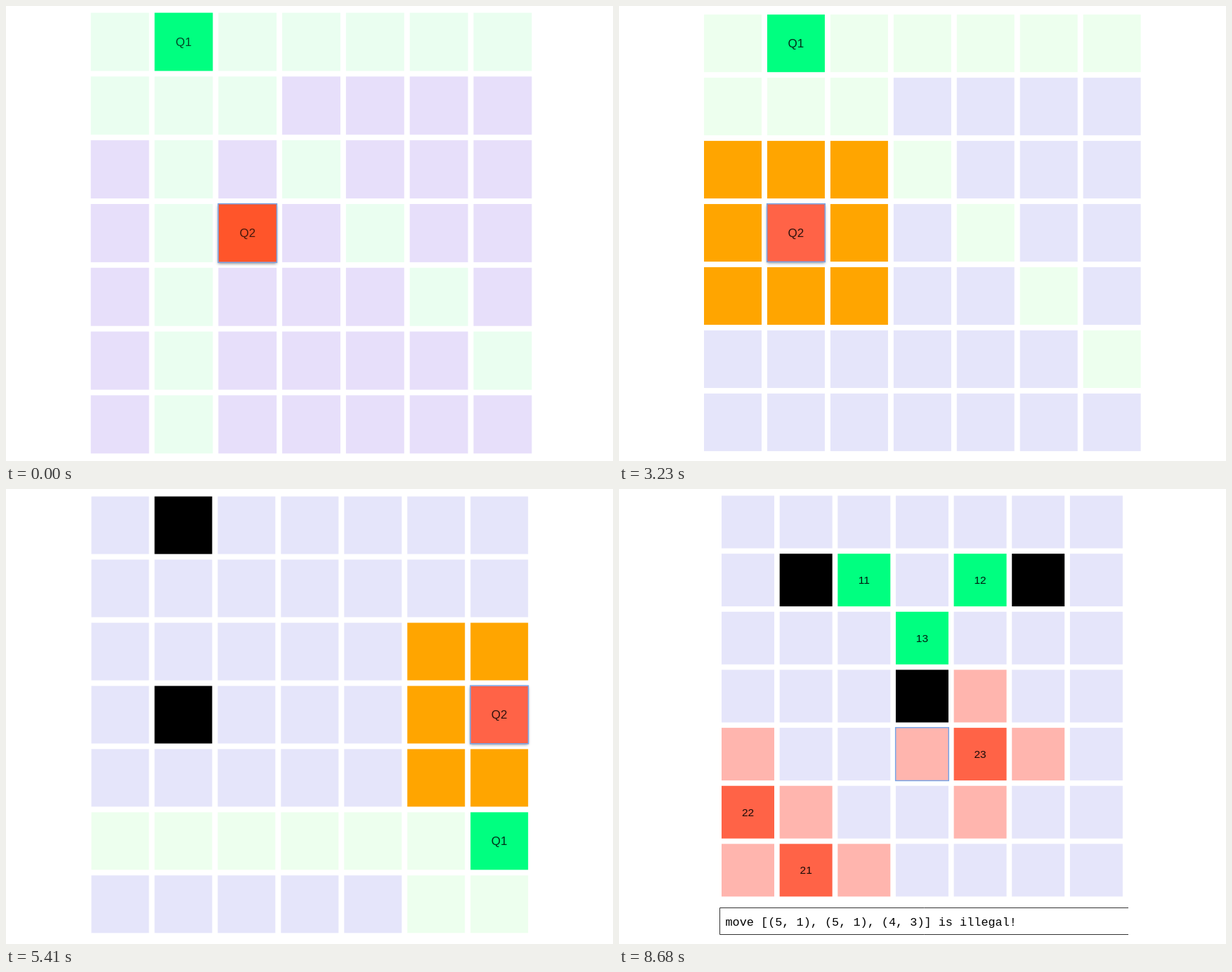
An HTML page with a canvas that plays this animation: 864 by 648 pixels, repeating every 9.77 s.

```html
<!DOCTYPE html>
<html lang="en">
<head>
<meta charset="utf-8">
<title>Board games</title>
<style>
html, body { margin: 0; width: 100%; height: 100%; overflow: hidden; background: #fff; }
canvas { display: block; }
</style>
</head>
<body>
<canvas id="stage" width="864" height="648"></canvas>
<script>
const ctx = document.getElementById('stage').getContext('2d');
const FIRST = 1050, STEP = 1090, LOOP = 9770;

// Cell codes: . free, g/r moves of each side, G/R pieces, o blocked, # burnt
const trail = {
  pitch: 90.8, size: 82.9, font: 17, ink: 'rgba(0,0,0,.72)', names: { G: ['Q1'], R: ['Q2'] },
  colors: { '.': '#e7dffa', g: '#eafef0', r: '#ffe6e2', G: '#00ff80', R: '#ff552a', o: '#ffb000', '#': '#000' }
};
const splash = {
  ...trail, pitch: 89.95, size: 82, ink: 'rgba(0,0,0,.82)',
  colors: { '.': '#e5e5fa', g: '#edffee', r: '#ffe4e1', G: '#00ff80', R: '#ff6347', o: '#ffa500', '#': '#000' }
};
const squad = {
  ...splash, pitch: 90.15, ink: 'rgba(0,0,0,.9)',
  names: { G: ['11', '12', '13'], R: ['23', '22', '21'] },
  colors: { ...splash.colors, g: '#beffbe', r: '#ffb5ae' }
};
const small = { ...squad, pitch: 82.65, size: 75, font: 15.5 };

const met = '....... .#G.G#. ...G... ...#r.. r..rRr. Rr..r.. rRr....';
const scenes = [
  { game: trail, x: 120.7, y: 9.6, focus: [3, 2], shade: true,
    board: 'gGggggg ggg.... .g.g... .gR.g.. .g...g. .g....g .g.....' },
  { game: trail, x: 117.5, y: 10.3, focus: [5, 6],
    board: '.#..... r.o.... .rro... rrRro.. .rrr.o. r.r.r.G ..r..r.' },
  { game: trail, x: 117.5, y: 11, focus: [6, 5],
    board: '.#....g ..g...g ...g..g ..#.g.g ...o.gg ....ogG .....Rg' },
  { game: splash, x: 121, y: 12.2, focus: [3, 1], shade: true,
    board: 'gGggggg ggg.... ooog... oRo.g.. ooo..g. ......g .......' },
  { game: splash, x: 120.8, y: 13.4, focus: [5, 6], shade: true,
    board: '.#..r.. .r.r... rrr.... rRrrrrr rrr..oo .r.r.oG .r..roo' },
  { game: splash, x: 121.5, y: 10.6, focus: [3, 6], shade: true,
    board: '.#..... ....... .....oo .#...oR .....oo ggggggG .....gg' },
  { game: squad, x: 120.2, y: 11, focus: [4, 4], shade: true, hover: [0, 4],
    board: '.g...g. gGg.gGg .g.g.g. ..gGg.. ...gR.. R...... .R.....' },
  { game: small, x: 146, y: 11.5, focus: [2, 3], note: '', board: met },
  { game: small, x: 146, y: 9.5, focus: [4, 3], board: met,
    note: 'move [(5, 1), (5, 1), (4, 3)] is illegal!' }
];

function drawShade(x, y, size) {
  ctx.save();
  ctx.shadowColor = 'rgba(0,0,0,.45)';
  ctx.shadowBlur = 4;
  ctx.shadowOffsetY = 2;
  ctx.fillStyle = '#fff';
  ctx.fillRect(x, y, size, size);
  ctx.restore();
}

function drawNote(text, top) {
  ctx.strokeStyle = '#333';
  ctx.lineWidth = 1;
  ctx.beginPath();
  ctx.moveTo(725, top);
  ctx.lineTo(143.5, top);
  ctx.lineTo(143.5, top + 38);
  ctx.lineTo(725, top + 38);
  ctx.stroke();
  ctx.fillStyle = '#000';
  ctx.font = '16.85px "Courier New", "Liberation Mono", monospace';
  ctx.textAlign = 'left';
  ctx.fillText(text, 151.5, top + 25);
}

function drawScene({ game, x, y, board, focus, shade, hover, note }) {
  const { pitch, size, colors, names } = game;
  const place = ([row, col]) => [x + col * pitch, y + row * pitch];
  ctx.fillStyle = '#fff';
  ctx.fillRect(0, 0, 864, 648);
  if (shade) drawShade(...place(focus), size);
  if (hover) drawShade(...place(hover), size);

  const used = { G: 0, R: 0 };
  ctx.font = `${game.font}px "Liberation Sans", Arial, sans-serif`;
  ctx.textAlign = 'center';
  board.split(' ').forEach((line, row) => [...line].forEach((code, col) => {
    const [cx, cy] = place([row, col]);
    ctx.fillStyle = colors[code];
    ctx.fillRect(cx, cy, size, size);
    if (!names[code]) return;
    ctx.fillStyle = game.ink;
    ctx.fillText(names[code][used[code]++], cx + size / 2, cy + size / 2 + game.font * .35);
  }));

  const [fx, fy] = place(focus);
  ctx.strokeStyle = '#78a5e6';
  ctx.lineWidth = 1.5;
  ctx.strokeRect(fx - .3, fy - .3, size + .6, size + .6);
  if (note !== undefined) drawNote(note, y + 587);
}

const start = performance.now();
let shown = -1;
function tick() {
  const t = (performance.now() - start) % LOOP;
  const index = t < FIRST ? 0 : 1 + Math.floor((t - FIRST) / STEP);
  if (index !== shown) drawScene(scenes[shown = index]);
  requestAnimationFrame(tick);
}
tick();
</script>
</body>
</html>
```
